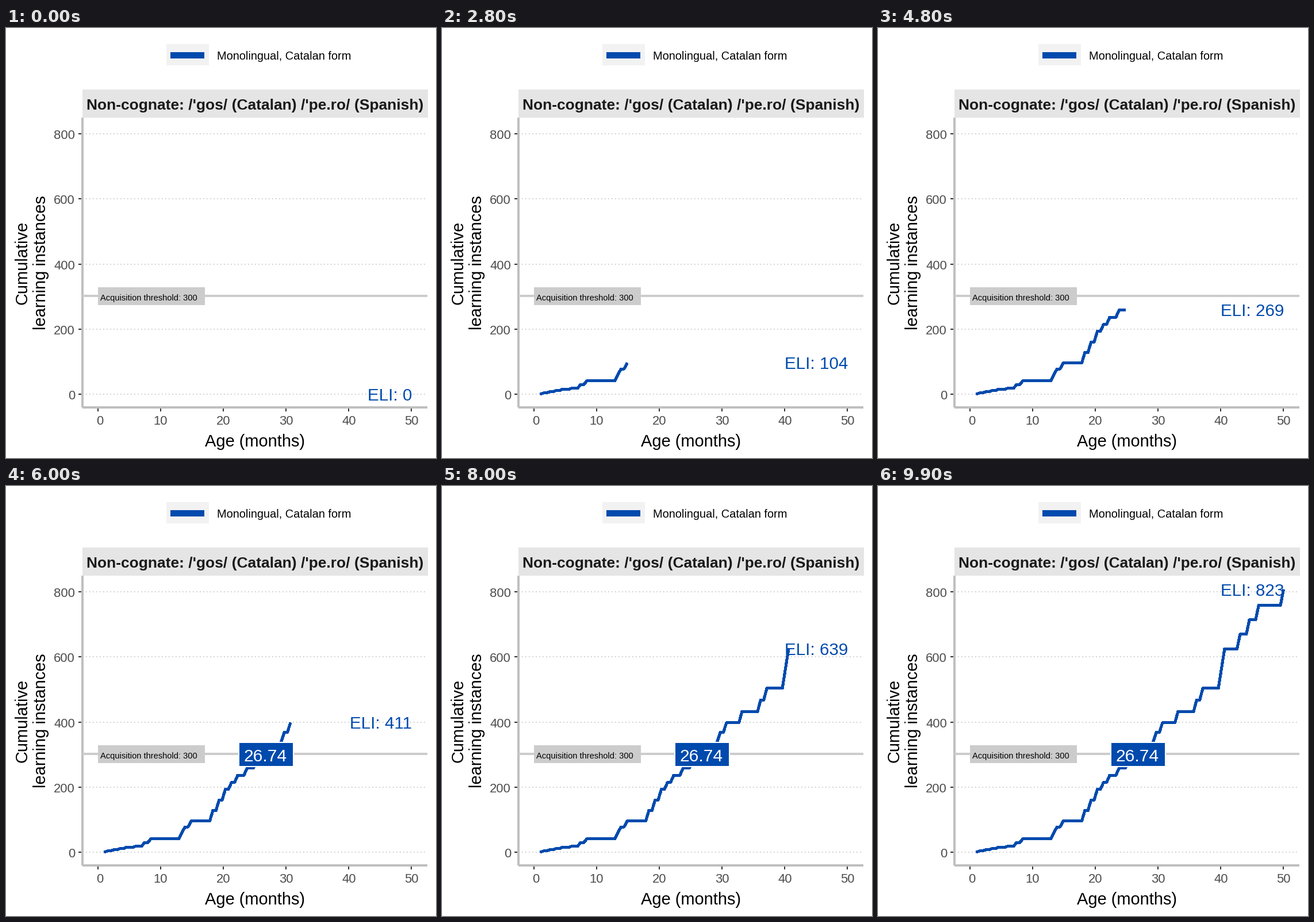
Recreate the animation shown at these times as a matplotlib script. Size 748 by 748 pixels, loop 10 s.

```python
import numpy as np
import matplotlib.pyplot as plt
from matplotlib.animation import FuncAnimation
from matplotlib.patches import Rectangle

SIZE, FRAMES = 748, 100
BLUE, AXIS, GREY = "#004aad", "#bfbfbf", "#cccccc"
LEFT, RIGHT, TOP, BOTTOM = 133, 733, 156, 660
THRESHOLD = 300

plt.rcParams["font.family"] = ["Liberation Sans"]

# At 72 dpi one point equals one pixel.
fig = plt.figure(figsize=(SIZE / 72, SIZE / 72), dpi=72, facecolor="white")
ax = fig.add_axes([0, 0, 1, 1])
ax.set_xlim(0, SIZE)
ax.set_ylim(SIZE, 0)
ax.axis("off")


def to_x(age):
    return 160 + 10.91 * age


def to_y(count):
    return 637 - 0.566 * count


def box(x0, y0, x1, y1, color, z=1, **kw):
    return ax.add_patch(Rectangle((x0, y0), x1 - x0, y1 - y0, facecolor=color,
                                  zorder=z, **kw))


def line(xs, ys, color, width, z=2, **kw):
    kw.setdefault("solid_capstyle", "butt")
    return ax.plot(xs, ys, color=color, lw=width, zorder=z, **kw)[0]


def text(x, y, s, size, color="black", ha="center", z=8, **kw):
    return ax.text(x, y, s, fontsize=size, color=color, ha=ha, va="baseline",
                   zorder=z, **kw)


def climb(flights):
    """Staircase of running totals: evenly spaced, equal rises per flight."""
    totals = np.zeros(FRAMES)
    for first, last, rises, top in flights:
        base = totals[-1]
        for n, step in enumerate(np.linspace(first, last, rises), 1):
            totals[int(step):] = base + (top - base) * n / rises
    return totals


# Legend
box(279, 28, 353, 65, "#f2f2f2")
box(286, 42, 345, 53, BLUE)
text(367, 55, "Monolingual, Catalan form", 20, ha="left")

# Strip title
box(LEFT, 107, 734, TOP, "#e5e5e5")
text(433, 142, "Non-cognate: /'gos/ (Catalan) /'pe.ro/ (Spanish)", 26.4,
     "#1a1a1a", weight="bold")

# Grid, ticks and axes
for count in range(0, 801, 200):
    y = to_y(count)
    line([LEFT, RIGHT], [y, y], AXIS, 1.6, z=1, ls=(0, (1, 2.75)),
         dash_capstyle="butt")
    line([126, 132], [y, y], "#333333", 2)
    text(120, y + 9, str(count), 22, "#4d4d4d", ha="right")

for age in range(0, 51, 10):
    x = to_x(age)
    line([x, x], [BOTTOM, 667], "#333333", 2)
    text(x + (0 if age else 3), 690, str(age), 22, "#4d4d4d")

line([LEFT, LEFT], [TOP, BOTTOM], AXIS, 4, z=3)
line([LEFT, RIGHT], [BOTTOM, BOTTOM], AXIS, 4, z=3)

text(433, 728, "Age (months)", 29)
for x, s in ((37, "Cumulative"), (69, "learning instances")):
    text(x, 408, s, 29, rotation=90, rotation_mode="anchor")

# Acquisition threshold
line([LEFT, RIGHT], [466, 466], GREY, 4, z=4)
box(160, 451, 346, 482, GREY, z=5)
text(164, 474, f"Acquisition threshold: {THRESHOLD}", 14.6, ha="left")

# Learning spurts: first step, last step, number of rises, total reached
counts = climb([
    (1, 10, 5, 18), (13, 15, 2, 41), (25, 28, 3, 96), (35, 39, 3, 193),
    (41, 49, 4, 280), (52, 52, 1, 310), (57, 60, 3, 398), (65, 65, 1, 432),
    (71, 73, 2, 504), (79, 80, 2, 625), (85, 91, 3, 759), (99, 99, 1, 807),
])
ages = np.linspace(1, 50, FRAMES)
xs, ys = to_x(ages), to_y(counts)

# The printed score runs slightly ahead of the curve.
scores = counts + 2.1 * counts ** 0.3
reached = int(np.argmax(scores >= THRESHOLD))

curve = line([], [], BLUE, 4, z=6, solid_joinstyle="round", antialiased=False)
score = text(706, 0, "", 29.6, BLUE, ha="right", z=5.5)
badge = [
    box(405, 446, 500, 488, BLUE, z=7, edgecolor="white", lw=2),
    text(451, 479, f"{ages[reached]:.2f}", 30, "white"),
]


def update(i):
    curve.set_data(xs[:i + 1], ys[:i + 1])
    score.set_text(f"ELI: {scores[i]:.0f}")
    score.set_y(ys[i] + 10.6)
    for part in badge:
        part.set_visible(i >= reached)
    return [curve, score, *badge]


anim = FuncAnimation(fig, update, frames=FRAMES, interval=100, repeat=True,
                     repeat_delay=0, blit=False)
plt.show()
```
